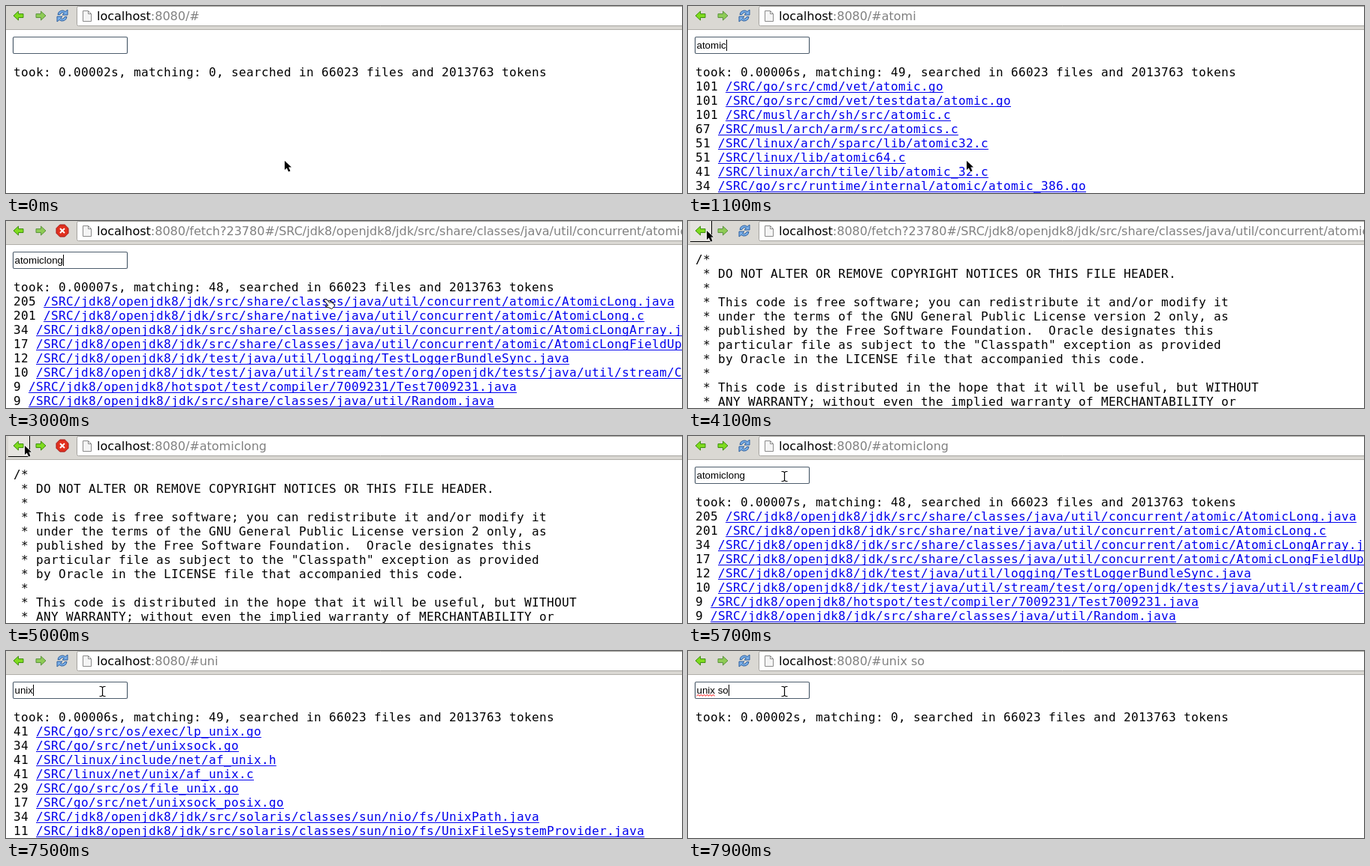
An HTML page with a canvas for the animation above (8 s loop, 900 by 250 pixels).

```html
<!DOCTYPE html>
<html lang="en">
<head>
<meta charset="utf-8">
<title>Code search</title>
<style>
  html, body { margin: 0; width: 100%; height: 100%; overflow: hidden; background: #fff; }
  canvas { display: block; }
</style>
</head>
<body>
<canvas id="stage" width="900" height="250"></canvas>
<script>
const ctx = document.getElementById('stage').getContext('2d');
const LOOP = 8000, TICK = 100;
const MONO = '16px "DejaVu Sans Mono", monospace';
const SANS = '16px "DejaVu Sans", sans-serif';
const TIP = '12.5px "DejaVu Sans", sans-serif';
const FIELD = '13.333px "Liberation Sans", Arial, sans-serif';
const CELL = 10, LEFT = 10, ROW = 19, FIRST_BASELINE = 94;

// A leading number is a fixed score; otherwise it follows from the name length.
const anyFiles = `go/test/a.go
go/src/cmd/api/api.go
linux/arch/arm/mm/abort.S
musl/src/math/acos.c
musl/src/stdlib/abs.c
go/src/cmd/asm/internal/asm/asm.go
jdk8/openjdk8/jdk/src/share/classes/java/util/jar/Attributes.java
jdk8/openjdk8/jdk/src/share/classes/java/util/concurrent/atomic/Atomic.java`.split('\n');
const atomicFiles = `go/src/cmd/vet/atomic.go
go/src/cmd/vet/testdata/atomic.go
musl/arch/sh/src/atomic.c
musl/arch/arm/src/atomics.c
linux/arch/sparc/lib/atomic32.c
linux/lib/atomic64.c
linux/arch/tile/lib/atomic_32.c
go/src/runtime/internal/atomic/atomic_386.go`.split('\n');
const longFiles = `205 jdk8/openjdk8/jdk/src/share/classes/java/util/concurrent/atomic/AtomicLong.java
201 jdk8/openjdk8/jdk/src/share/native/java/util/concurrent/atomic/AtomicLong.c
34 jdk8/openjdk8/jdk/src/share/classes/java/util/concurrent/atomic/AtomicLongArray.java
17 jdk8/openjdk8/jdk/src/share/classes/java/util/concurrent/atomic/AtomicLongFieldUpdater.java
12 jdk8/openjdk8/jdk/test/java/util/logging/TestLoggerBundleSync.java
10 jdk8/openjdk8/jdk/test/java/util/stream/test/org/openjdk/tests/java/util/stream/CollectorsTest.java
9 jdk8/openjdk8/hotspot/test/compiler/7009231/Test7009231.java
9 jdk8/openjdk8/jdk/src/share/classes/java/util/Random.java`.split('\n');
const unixFiles = `go/src/os/exec/lp_unix.go
go/src/net/unixsock.go
linux/include/net/af_unix.h
linux/net/unix/af_unix.c
go/src/os/file_unix.go
go/src/net/unixsock_posix.go
jdk8/openjdk8/jdk/src/solaris/classes/sun/nio/fs/UnixPath.java
jdk8/openjdk8/jdk/src/solaris/classes/sun/nio/fs/UnixFileSystemProvider.java`.split('\n');

// time, query, digit of the search time, matches, files
const queries = [
  [-500, '', 2, 0, []],
  [300, 'a', 9, 50, anyFiles],
  [600, 'at', 8, 50, atomicFiles],
  [700, 'ato', 8, 50, atomicFiles],
  [900, 'atom', 7, 50, atomicFiles],
  [1000, 'atomi', 7, 49, atomicFiles],
  [1100, 'atomic', 6, 49, atomicFiles],
  [1200, 'atomicl', 7, 48, longFiles],
  [1400, 'atomiclo', 7, 48, longFiles],
  [1500, 'atomiclon', 7, 48, longFiles],
  [1700, 'atomiclong', 7, 48, longFiles],
  [5200, 'atomiclong', 7, 48, longFiles],
  [6200, '', 1, 0, []],
  [7100, 'u', 9, 50, unixFiles],
  [7300, 'un', 8, 50, unixFiles],
  [7400, 'uni', 7, 49, unixFiles],
  [7500, 'unix', 6, 49, unixFiles],
  [7600, 'unix ', 6, 49, unixFiles],
  [7700, 'unix s', 3, 0, []],
  [7800, 'unix so', 2, 0, []],
].map(([time, query, took, matches, files]) => ({ time, query, took, matches, files }));

const mousePath = [
  [0, 371, 207], [1800, 371, 207], [2400, 424, 103], [2600, 418, 100], [2800, 423, 104],
  [3400, 423, 104], [4100, 25, 13], [5100, 25, 13], [5500, 128, 54], [LOOP, 128, 54],
];

const header = `/*
 * DO NOT ALTER OR REMOVE COPYRIGHT NOTICES OR THIS FILE HEADER.
 *
 * This code is free software; you can redistribute it and/or modify it
 * under the terms of the GNU General Public License version 2 only, as
 * published by the Free Software Foundation.  Oracle designates this
 * particular file as subject to the "Classpath" exception as provided
 * by Oracle in the LICENSE file that accompanied this code.
 *
 * This code is distributed in the hope that it will be useful, but WITHOUT
 * ANY WARRANTY; without even the implied warranty of MERCHANTABILITY or`.split('\n');

const within = (t, from, to) => t >= from && t < to;
const queryAt = t => queries.findLast(q => q.time <= t) || queries[0];

function mouseAt(t) {
  const i = mousePath.findIndex(p => p[0] > t);
  const [t0, x0, y0] = mousePath[i - 1], [t1, x1, y1] = mousePath[i];
  const u = (t - t0) / (t1 - t0), k = u * u * (3 - 2 * u);
  return { x: Math.round(x0 + (x1 - x0) * k), y: Math.round(y0 + (y1 - y0) * k) };
}

function rect(x, y, w, h, color) {
  ctx.fillStyle = color;
  ctx.fillRect(x, y, w, h);
}

function text(string, x, y, font, color = '#000') {
  ctx.font = font;
  ctx.letterSpacing = '0px';
  // Monospace text sits on whole-pixel cells.
  if (font === MONO) ctx.letterSpacing = `${CELL - ctx.measureText('0').width}px`;
  ctx.fillStyle = color;
  ctx.fillText(string, x, y);
  return ctx.measureText(string).width;
}

function shape(path, x, y, fill, stroke, width = 1) {
  const p = new Path2D(path);
  ctx.save();
  ctx.translate(x, y);
  ctx.lineJoin = 'round';
  if (fill) { ctx.fillStyle = fill; ctx.fill(p); }
  if (stroke) { ctx.strokeStyle = stroke; ctx.lineWidth = width; ctx.stroke(p); }
  ctx.restore();
}

function resultLinks({ query, files }) {
  return files.map((entry, i) => {
    const [, fixed, path] = entry.match(/^(?:(\d+) )?(.*)$/);
    const stem = path.split('/').pop().split('.')[0];
    const extra = Math.max(0, stem.length - query.trim().length);
    const score = fixed || String(Math.floor(1 + 100 / (1 + extra / 2)));
    const link = '/SRC/' + path;
    return {
      score, link, baseline: FIRST_BASELINE + ROW * (i + 1),
      x: LEFT + (score.length + 1) * CELL, width: link.length * CELL,
    };
  });
}

function drawToolbar(t, mouse) {
  rect(0, 0, 900, 31, '#dad8d3');
  rect(0, 31, 900, 1, '#b0aea9');
  if (mouse.x < 32 && mouse.y < 28) {
    rect(3, 0, 28, 27, '#e6e4e0');
    rect(3, 27, 29, 1, '#000');
    rect(31, 0, 1, 28, '#000');
  }
  const arrow = 'M0 6.5 L6.5 .5 V4 H13 V9 H6.5 V12.5 Z';
  shape(arrow, 10, 6.5, '#7fdb1e', '#3f8f12');
  ctx.save();
  ctx.translate(53, 6.5);
  ctx.scale(-1, 1);
  const canForward = within(t, 5000, 6400);
  shape(arrow, 0, 0, canForward ? '#7fdb1e' : '#8ecb55', canForward ? '#3f8f12' : '#5d9440');
  ctx.restore();

  if (within(t, 3000, 3200) || within(t, 5000, 5200)) {
    shape('M-3.3 -8 H3.3 L8 -3.3 V3.3 L3.3 8 H-3.3 L-8 3.3 V-3.3 Z', 75, 13, '#e0301e', '#a31515');
    shape('M-3 -3 L3 3 M3 -3 L-3 3', 75, 13, null, '#fff', 2);
  } else {
    const half = 'M-6 -1 A6 6 0 0 1 4 -5 L7 -7.5 V-.5 H0 L2.5 -3 A3.7 3.7 0 0 0 -3.2 -1 Z';
    shape(half, 75, 12.5, '#78aee8', '#2c5f9e');
    ctx.save();
    ctx.translate(75, 13.5);
    ctx.rotate(Math.PI);
    shape(half, 0, 0, '#78aee8', '#2c5f9e');
    ctx.restore();
  }

  shape('M2 0 H820 V26 H2 Q0 26 0 24 V2 Q0 0 2 0 Z', 94.5, .5, '#fff', '#a5a39e');
  shape('M0 0 H7 L11 4 V14 H0 Z M7 0 V4 H11', 102.5, 6.5, '#f4f4f4', '#8a8a8a');
  const address = within(t, 3000, 5000)
    ? 'fetch?23780#/SRC/jdk8/openjdk8/jdk/src/share/classes/java/util/concurrent/atomic/AtomicLong.java'
    : '#' + queryAt(t - TICK).query;
  const hostWidth = text('localhost', 121, 19, SANS);
  text(':8080/' + address, 121 + hostWidth, 19, SANS, '#808080');
}

function drawSearch(t, state, links) {
  ctx.beginPath();
  ctx.roundRect(9.5, 41.5, 152, 22, 1.5);
  ctx.strokeStyle = '#4c5c6c';
  ctx.lineWidth = 1.2;
  ctx.stroke();
  const width = text(state.query, 11.5, 57, FIELD);
  if (state.query.startsWith('unix ')) {
    let wave = 'M0 1';
    for (let x = 2; x <= 24; x += 2) wave += `L${x} ${x % 4 ? -.5 : 1}`;
    shape(wave, 11.5, 59, null, '#f00');
  }
  if (t >= 6100 || (t - state.time) % 1000 < 500) rect(Math.ceil(11 + width), 45, 1, 15, '#000');

  text(`took: 0.0000${state.took}s, matching: ${state.matches}, searched in 66023 files and 2013763 tokens`,
    LEFT, FIRST_BASELINE, MONO);
  for (const { score, link, x, width, baseline } of links) {
    text(score, LEFT, baseline, MONO);
    text(link, x, baseline, MONO, '#00e');
    rect(x, baseline + 2, width, 1, '#00e');
  }
}

function drawMouse({ x, y }, kind) {
  if (kind === 'beam') {
    const beam = 'M-3.5 -6.5 H-1.5 L.5 -5.5 L2.5 -6.5 H4.5 M.5 -5.5 V5.5 M-3.5 6.5 H-1.5 L.5 5.5 L2.5 6.5 H4.5';
    shape(beam, x, y, null, '#fff', 2.5);
    shape(beam, x, y, null, '#000', 1.2);
  } else if (kind === 'hand') {
    shape('M.5 1 Q2 -.5 3.5 1 L6 3 L8 2.5 L10 3.5 L12 4.5 L14 8 L14.5 10 L10.5 13.5 L8 12 L3 11 L2.5 9.5 L6 9 L1 3 Z',
      x, y, '#fff', '#000');
    shape('M6 3 L8 6 M8 2.5 L10 6 M10 3.5 L12 6.5', x, y, null, '#000', .8);
  } else {
    shape('M0 0 V12 L2.8 9.4 L5.2 14.5 L7.5 13.4 L5.2 8.6 H9 Z', x, y, '#000', '#fff', 1.4);
    shape('M0 0 V12 L2.8 9.4 L5.2 14.5 L7.5 13.4 L5.2 8.6 H9 Z', x, y, '#000');
  }
}

function draw(t) {
  const mouse = mouseAt(t), state = queryAt(t), links = resultLinks(state);
  const showsFile = within(t, 3100, 5100);
  rect(0, 0, 900, 250, '#fff');
  drawToolbar(t, mouse);

  let kind = 'arrow';
  if (showsFile) {
    header.forEach((line, i) => text(line, LEFT, 57 + ROW * i, MONO));
    if (mouse.y > 40) kind = 'beam';
  } else {
    drawSearch(t, state, links);
    const overLink = links.some(l => within(mouse.y, l.baseline - 15, l.baseline + 4)
      && within(mouse.x, l.x, l.x + l.width));
    if (overLink) kind = 'hand';
    else if (within(mouse.y, 41, 64) && within(mouse.x, 9, 162)) kind = 'beam';
  }

  if (within(t, 4600, 4900)) {
    rect(35, 28, 233, 21, '#000');
    rect(36, 29, 231, 19, '#f5f5b5');
    text('Click to go back, hold to see history', 39, 43, TIP);
  }
  drawMouse(mouse, kind);
}

const start = performance.now();
function frame() {
  const t = (performance.now() - start) % LOOP;
  draw(Math.floor(t / TICK) * TICK);
  requestAnimationFrame(frame);
}
frame();
</script>
</body>
</html>
```
